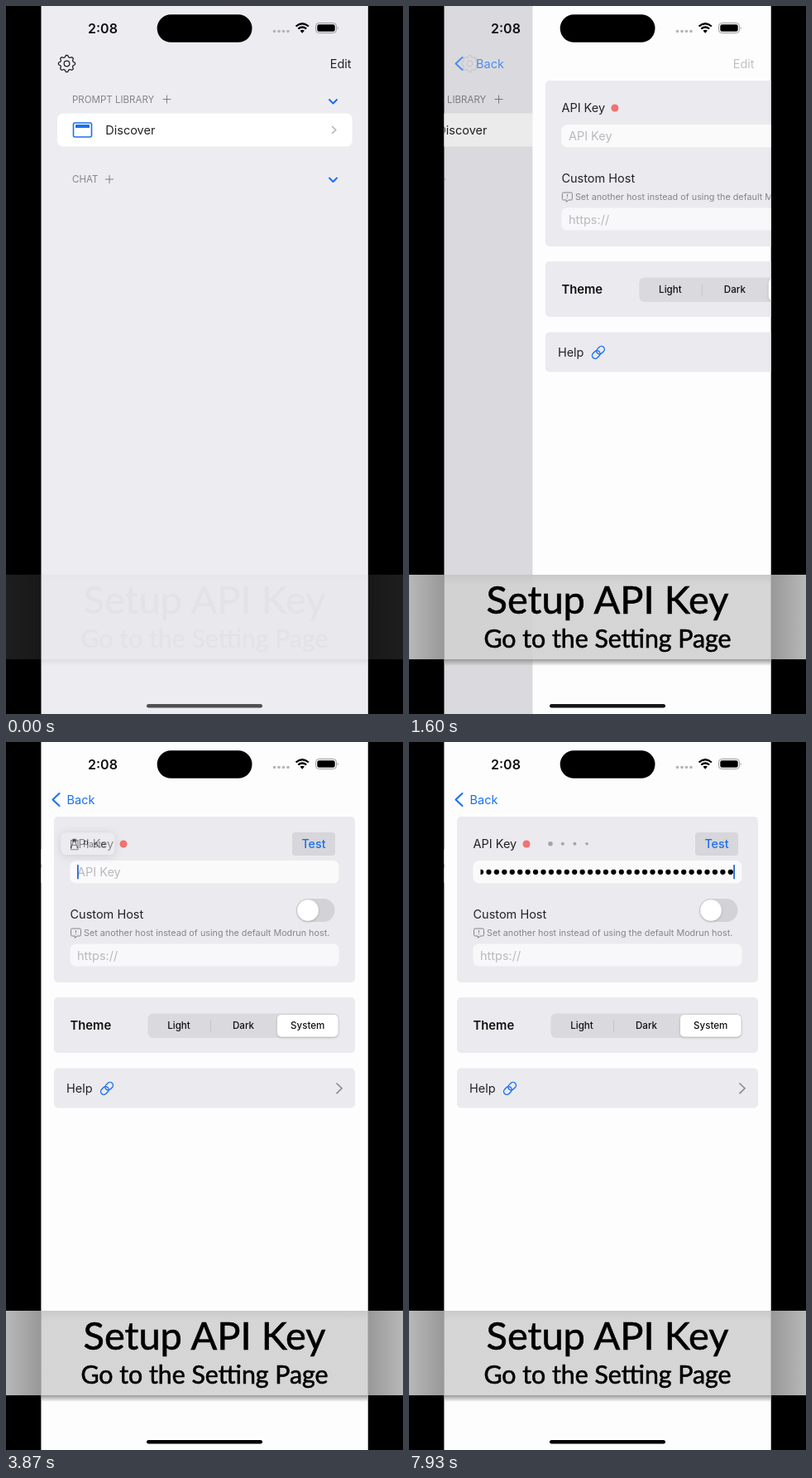
These frames come from a looping animation (480x854 px, 8 s). An HTML page:

```html
<!DOCTYPE html>
<html lang="en">
<head>
<meta charset="utf-8">
<title>Setup walkthrough</title>
<style>
  html, body { margin: 0; width: 100%; height: 100%; overflow: hidden; background: #000; }
  svg { position: fixed; inset: 0; width: 100%; height: 100%; display: block; }
  text { font: 14.5px Inter, "Liberation Sans", sans-serif; fill: #222226; }
  .small { font-size: 11.5px; fill: #85858a; }
  .hint { font-size: 10.8px; fill: #85858a; }
  .ghost { fill: #b9b9be; }
  .seg { font-size: 11.6px; font-weight: 500; text-anchor: middle; fill: #111; }
  .blue { fill: #1a70f0; }
  .line { fill: none; stroke: #1a70f0; stroke-width: 2; stroke-linecap: round; stroke-linejoin: round; }
  .caption { font-family: Lato, "Open Sans", sans-serif; text-anchor: middle; fill: #000; stroke: #000; stroke-width: .6; }
</style>
</head>
<body>
<svg viewBox="0 0 480 854" preserveAspectRatio="none">
  <defs>
    <clipPath id="screen"><rect x="42.5" width="395" height="854"/></clipPath>
    <clipPath id="keyClip"><rect x="86.5" y="145" width="312" height="24"/></clipPath>
    <linearGradient id="leftBand"><stop stop-color="#b8b8b8"/><stop offset="1" stop-color="#989898"/></linearGradient>
    <linearGradient id="rightBand"><stop stop-color="#989898"/><stop offset="1" stop-color="#b8b8b8"/></linearGradient>
    <linearGradient id="midBand" x2="0" y2="1">
      <stop stop-color="#c4c4c4"/><stop offset=".12" stop-color="#d1d1d1"/><stop offset="1" stop-color="#d1d1d1"/>
    </linearGradient>
    <linearGradient id="bandShadow" x2="0" y2="1">
      <stop stop-color="#999"/><stop offset="1" stop-color="#999" stop-opacity="0"/>
    </linearGradient>
    <filter id="soft" x="-30%" y="-50%" width="160%" height="200%">
      <feDropShadow dx="0" dy="1" stdDeviation="1.5" flood-opacity=".2"/>
    </filter>
    <filter id="lift" x="-40%" y="-80%" width="180%" height="260%">
      <feDropShadow dx="0" dy="2" stdDeviation="8" flood-opacity=".25"/>
    </filter>
  </defs>

  <rect width="480" height="854"/>
  <g clip-path="url(#screen)">
    <rect x="42" width="396" height="854" fill="#edecf1"/>
    <g id="home">
      <text class="small" x="80" y="116.5">PROMPT LIBRARY</text>
      <text class="small" x="80" y="213">CHAT</text>
      <path d="M189.5 112.5h10m-5-5v10M120 209h10m-5-5v10" fill="none" stroke="#808085"/>
      <path class="line" d="M391 113l4.5 4.5 4.5-4.5M391 207.5l4.5 4.5 4.5-4.5"/>
      <rect x="62" y="129.5" width="356.5" height="40" rx="7" fill="#fff"/>
      <rect class="line" x="81.5" y="141" width="22" height="17" rx="2" style="stroke-width:1.6"/>
      <rect class="blue" x="84" y="143" width="17" height="4" rx=".5"/>
      <text x="120.3" y="154.8">Discover</text>
      <path d="M394 145l4.7 4.5-4.7 4.5" fill="none" stroke="#b4b4b9" stroke-width="1.6"/>
    </g>
    <rect id="dim" x="42" width="396" height="854"/>

    <g id="settings">
      <rect x="42.5" width="396" height="854" fill="#fdfdfe"/>
      <g fill="#ebeaef">
        <rect x="58" y="90" width="364" height="200" rx="5"/>
        <rect x="58" y="308" width="364" height="67" rx="5"/>
        <rect x="58" y="393.5" width="364" height="48" rx="5"/>
      </g>
      <text x="77.5" y="128.2">API Key</text>
      <circle cx="142" cy="123" r="4.5" fill="#f07172"/>
      <g id="loader" fill="#a4a4a9"></g>
      <rect x="346" y="109" width="52" height="28" rx="4" fill="#d6d6db"/>
      <text id="test" class="blue" x="372" y="128.2" text-anchor="middle" style="font-weight:500;font-size:14.3px">Test</text>

      <rect x="77.5" y="143" width="325" height="27.5" rx="7" fill="#fafafb"/>
      <text id="keyHint" class="ghost" x="86" y="162.2">API Key</text>
      <g id="bullets" clip-path="url(#keyClip)"></g>
      <rect id="cursor" y="148" width="1.8" height="17.5" rx=".8" fill="#2468d8"/>

      <text x="77.5" y="213.3">Custom Host</text>
      <rect x="351" y="189" width="46.5" height="28" rx="14" fill="#d3d2d7"/>
      <circle cx="365" cy="203" r="12.8" fill="#fff" filter="url(#soft)"/>
      <path d="M80 225h9q1.5 0 1.5 1.5v6q0 1.5-1.5 1.5h-3l-2.5 2.5V234h-3.500q-1.5 0-1.5-1.5v-6q0-1.5 1.500-1.500zM84.5 227v3m0 1.2v1" fill="none" stroke="#85858a"/>
      <text class="hint" x="94" y="234">Set another host instead of using the default Modrun host.</text>
      <rect x="77.5" y="243.5" width="325" height="27" rx="7" fill="#f8f8fa"/>
      <text class="ghost" x="86" y="262.5">https://</text>

      <text x="77.5" y="347.3" style="font-weight:600;font-size:14.8px;fill:#111">Theme</text>
      <rect x="171.5" y="327.5" width="231" height="29.5" rx="6" fill="#dad9de"/>
      <path d="M247.5 335v15" stroke="#c5c4ca"/>
      <rect x="328" y="329" width="73.5" height="26.5" rx="5" fill="#fff" filter="url(#soft)"/>
      <text class="seg" x="209" y="346.3">Light</text>
      <text class="seg" x="287" y="346.3">Dark</text>
      <text class="seg" x="364.7" y="346.3">System</text>

      <text x="73" y="423.2">Help</text>
      <g class="line" transform="translate(122 417.8) rotate(-45)" style="stroke-width:1.4">
        <rect x="-9" y="-3.7" width="10.5" height="7.4" rx="3.7"/>
        <rect x="-1.5" y="-3.7" width="10.5" height="7.4" rx="3.7"/>
      </g>
      <path d="M399.500 411.5l6.5 6.3-6.5 6.3" fill="none" stroke="#88888d" stroke-width="1.6"/>

      <g id="menu">
        <rect x="58" y="99" width="92" height="38" rx="9" fill="#eeeef1" filter="url(#lift)"/>
        <path d="M75 112h12v16H75zm3-2h6v4h-6z" fill="none" stroke="#222" stroke-width="1.6"/>
        <text x="96" y="124.5" style="font-size:15px;fill:#111">Paste</text>
      </g>
    </g>

    <g id="homeNav">
      <g id="gear" fill="none" stroke="#222226" stroke-width="1.3">
        <path id="cog"/><circle cx="73.5" cy="69.5" r="3.3"/>
      </g>
      <text x="391.7" y="75">Edit</text>
    </g>
    <g id="back">
      <path class="line" d="M64.5 62l-8 7.5 8 7.5"/>
      <text id="backText" class="blue" y="74.8">Back</text>
    </g>

    <text x="99" y="32.5" style="font-size:16px;font-weight:600;fill:#111">2:08</text>
    <rect x="182.7" y="10.3" width="114.8" height="33.5" rx="16.7"/>
    <g fill="#b4b4b9">
      <circle cx="324.5" cy="30.5" r="1.8"/><circle cx="330" cy="30.5" r="1.8"/>
      <circle cx="335.500" cy="30.5" r="1.8"/><circle cx="341" cy="30.5" r="1.8"/>
    </g>
    <path d="M350.5 24.5q7.7-6.5 15.4 0M353.2 27.5q5-4 10 0" fill="none" stroke="#000" stroke-width="2.2"/>
    <path d="M358.2 32.8l-2.7-3q2.7-2 5.4 0z"/>
    <rect x="374.5" y="20.5" width="25" height="12" rx="3.8" fill="none" stroke="#9b9ba0"/>
    <rect x="376.3" y="22.3" width="21.4" height="8.4" rx="2.3"/>
    <path d="M400.8 24.5q1.8 2 0 4z" fill="#9b9ba0"/>
    <rect id="homeBar" x="170" y="842" width="140" height="4.600" rx="2.3"/>
  </g>

  <g id="band">
    <rect y="686" width="42.5" height="102" fill="url(#leftBand)"/>
    <rect x="437.5" y="686" width="42.5" height="102" fill="url(#rightBand)"/>
    <rect x="42.5" y="686" width="395" height="102" fill="url(#midBand)" opacity=".9"/>
    <rect x="42.5" y="788" width="395" height="8" fill="url(#bandShadow)"/>
  </g>
  <g id="captions">
    <text class="caption" x="240" y="733" style="font-size:47px">Setup API Key</text>
    <text class="caption" x="240" y="774" style="font-size:30.3px">Go to the Setting Page</text>
  </g>
</svg>
<script>
const LOOP = 8000, FPS = 15;
const el = id => document.getElementById(id);
const set = (id, name, value) => el(id).setAttribute(name, value);
const fade = (id, value) => set(id, 'opacity', value);

// Piecewise interpolation over [time, value] steps.
function track(t, steps, ease = u => u) {
  if (t <= steps[0][0]) return steps[0][1];
  for (let i = 1; i < steps.length; i++) {
    const [t0, a] = steps[i - 1], [t1, b] = steps[i];
    if (t < t1) return a + (b - a) * ease((t - t0) / (t1 - t0));
  }
  return steps[steps.length - 1][1];
}
const smooth = u => (1 - Math.cos(Math.PI * u)) / 2;

const CURSOR = [
  [2333, 0], [2467, 1], [3000, 1], [3200, 0], [3333, 0], [3533, 1],
  [5200, 1], [5400, 0], [5600, 0], [5733, 1], [6100, 1], [6300, 0],
  [6530, 0], [6733, 1], [7070, 1], [7270, 0], [7530, 0], [7730, 1]
];
const MENU_ALPHA = [[3733, 0], [4000, 1], [4667, 1], [4733, .5], [4933, 0]];
const MENU_SCALE = [[3733, .4], [4000, 1], [4667, 1], [4733, .58], [4933, .35]];
const TEST_ALPHA = [[6000, 1], [6067, .35], [6133, .35], [6400, 1]];
const LOADER = [
  [6200, 0, 0, 0, 0], [6600, 3.5, 2.5, 1.8, .7], [6800, 3.2, 3.4, 3, 2.2],
  [6870, 3.2, 3.4, 3, 2.2], [7250, .8, 1.6, 2.4, 3.2],
  [7600, 2.2, .9, .8, 1.2], [7930, 2.8, 2, 2, 1.8]
];

function addCircle(parent, cx, cy, r) {
  const c = document.createElementNS('http://www.w3.org/2000/svg', 'circle');
  Object.entries({ cx, cy, r }).forEach(([k, v]) => c.setAttribute(k, v));
  return el(parent).appendChild(c);
}
for (let i = 0; i <= 32; i++) addCircle('bullets', 388.8 - i * 9.43, 156.8, 3.15);
const loaderDots = [171, 185.8, 200.4, 215].map(x => addCircle('loader', x, 122.7, 0));

const cogPoints = Array.from({ length: 96 }, (_, i) => {
  const a = i / 96 * 2 * Math.PI;
  const r = 9 + 1.1 * Math.tanh(2 * Math.cos(8 * a));
  return `${73.5 + r * Math.cos(a)} ${69.5 + r * Math.sin(a)}`;
});
set('cog', 'd', `M${cogPoints.join('L')}Z`);

function render(t) {
  const intro = Math.min(1, t / 733);
  fade('band', .16 + .84 * intro);
  fade('captions', .02 + .98 * intro);

  // Critically damped push from the home page to the settings page.
  const w = Math.max(0, t - 1400) * .0129;
  const rest = t > 2060 ? 0 : (1 + w) * Math.exp(-w);
  const done = 1 - rest;
  set('home', 'transform', `translate(${-118 * done})`);
  set('settings', 'transform', `translate(${394 * rest})`);
  fade('dim', .105 * done);
  fade('homeNav', rest);
  fade('gear', t >= 1330 ? .35 : 1);
  fade('back', done);
  set('backText', 'x', 73.5 + 28 * rest);
  const tone = Math.round(80 * rest);
  set('homeBar', 'fill', `rgb(${tone},${tone},${tone})`);

  const pasted = t >= 4730;
  fade('keyHint', pasted ? 0 : 1);
  fade('bullets', pasted ? 1 : 0);
  set('cursor', 'x', pasted ? 392.2 : 86);
  fade('cursor', track(t, CURSOR));

  const s = track(t, MENU_SCALE, smooth);
  fade('menu', track(t, MENU_ALPHA));
  set('menu', 'transform', `translate(87 134) scale(${s}) translate(-87 -134)`);

  fade('test', track(t, TEST_ALPHA));
  loaderDots.forEach((dot, i) =>
    dot.setAttribute('r', track(t, LOADER.map(row => [row[0], row[i + 1]]), smooth)));
}

const start = performance.now();
function tick() {
  const t = (performance.now() - start) % LOOP;
  render(Math.floor((t + 4) * FPS / 1000) % (LOOP * FPS / 1000) * 1000 / FPS);
  requestAnimationFrame(tick);
}
tick();
</script>
</body>
</html>
```
